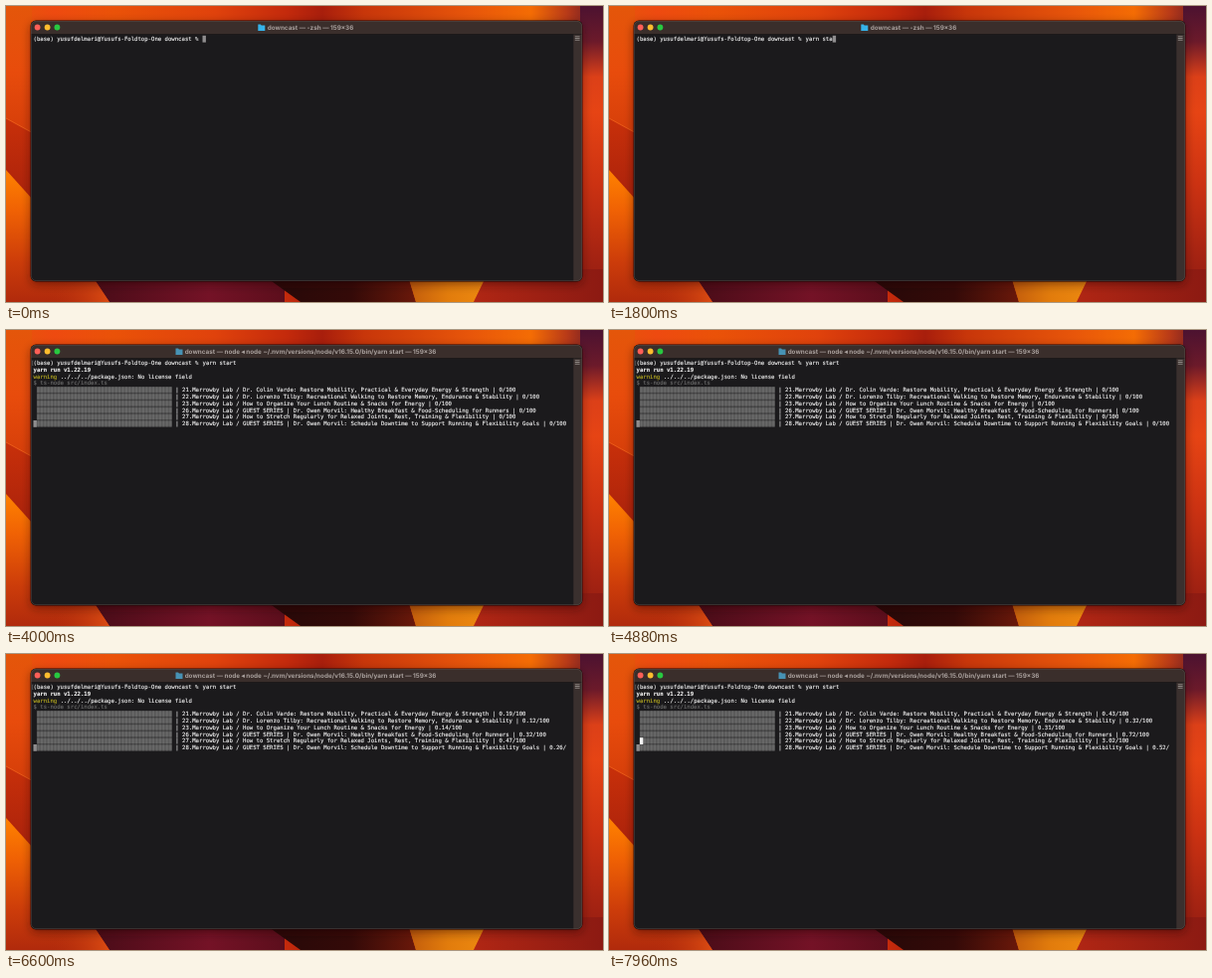
An HTML page that plays this animation: 600x298 px, repeating every 8000 ms.

```html
<!DOCTYPE html>
<html lang="en">
<head>
<meta charset="utf-8">
<title>Terminal</title>
<style>
  html, body { margin: 0; width: 100%; height: 100%; overflow: hidden; background: #c22a0c; }
  svg { display: block; width: 100vw; height: 100vh; }
  text { white-space: pre; text-rendering: geometricPrecision; }
  .mono { font: 5.648px "DejaVu Sans Mono", monospace; fill: #f4f4f4; stroke: #f4f4f4; stroke-width: .12px; }
  .bold { font-weight: 700; }
  .dim { fill: #6a6a6a; stroke: #6a6a6a; }
  .warn { fill: #b9ad20; stroke: #b9ad20; }
  .title { font: 700 6.35px Inter, sans-serif; fill: #aaa19e; text-anchor: middle; }
</style>
</head>
<body>
<svg viewBox="0 0 600 298" preserveAspectRatio="none">
  <defs>
    <linearGradient id="sky">
      <stop offset="0" stop-color="#e4560a"/>
      <stop offset=".08" stop-color="#ee4a10"/>
      <stop offset=".18" stop-color="#ea5208"/>
      <stop offset=".35" stop-color="#e0420c"/>
      <stop offset=".47" stop-color="#c42a0c"/>
      <stop offset=".53" stop-color="#a81e0c"/>
      <stop offset=".6" stop-color="#c8360a"/>
      <stop offset=".78" stop-color="#e8560a"/>
      <stop offset=".88" stop-color="#f46c04"/>
      <stop offset=".94" stop-color="#b83a18"/>
      <stop offset="1" stop-color="#5a1428"/>
    </linearGradient>
    <linearGradient id="leftEdge" x2="0" y2="1">
      <stop offset="0" stop-color="#e4560a"/>
      <stop offset=".22" stop-color="#e84c0c"/>
      <stop offset=".4" stop-color="#d8400a"/>
    </linearGradient>
    <linearGradient id="rightEdge" x2="0" y2="1">
      <stop offset="0" stop-color="#4c1230"/>
      <stop offset=".12" stop-color="#6c1a2a"/>
      <stop offset=".24" stop-color="#dc4018"/>
      <stop offset=".36" stop-color="#e64414"/>
      <stop offset=".6" stop-color="#cc3212"/>
      <stop offset="1" stop-color="#8c1a12"/>
    </linearGradient>
    <linearGradient id="fold" x2="0" y2="1">
      <stop offset="0" stop-color="#c8300a"/>
      <stop offset="1" stop-color="#9a1a0c"/>
    </linearGradient>
    <linearGradient id="leaf" x2="0" y2="1">
      <stop offset="0" stop-color="#ff8200"/>
      <stop offset=".3" stop-color="#f06204"/>
      <stop offset=".7" stop-color="#cc3c0a"/>
      <stop offset="1" stop-color="#b02a0c"/>
    </linearGradient>
    <linearGradient id="tip">
      <stop offset="0" stop-color="#b02a0c" stop-opacity="0"/>
      <stop offset="1" stop-color="#dc4c12"/>
    </linearGradient>
    <linearGradient id="plum">
      <stop offset="0" stop-color="#4a0c18"/>
      <stop offset=".6" stop-color="#741226"/>
      <stop offset="1" stop-color="#5c0e1c"/>
    </linearGradient>
    <linearGradient id="night">
      <stop offset="0" stop-color="#240808"/>
      <stop offset=".6" stop-color="#340a08"/>
      <stop offset="1" stop-color="#6a180a"/>
    </linearGradient>
    <linearGradient id="glow">
      <stop offset="0" stop-color="#c05a0c"/>
      <stop offset=".5" stop-color="#e27c0c"/>
      <stop offset="1" stop-color="#ee8a10"/>
    </linearGradient>
    <linearGradient id="ember">
      <stop offset="0" stop-color="#b02614"/>
      <stop offset="1" stop-color="#8c1a12"/>
    </linearGradient>
    <filter id="shade" x="-10%" y="-10%" width="120%" height="125%">
      <feDropShadow dx="0" dy="3" stdDeviation="5" flood-color="#200" flood-opacity=".45"/>
    </filter>
    <pattern id="cell" x="27.5" y="29.8" width="3.4" height="6.8" patternUnits="userSpaceOnUse">
      <rect width="3.4" height="6" y=".3" fill="#4d4d4d"/>
      <rect width="2.5" height="6" x=".4" y=".3" fill="#686868"/>
    </pattern>
    <clipPath id="frame"><rect x="25" y="15" width="554" height="262" rx="5"/></clipPath>
  </defs>

  <rect width="600" height="298" fill="url(#sky)"/>
  <rect y="0" width="26" height="298" fill="url(#leftEdge)"/>
  <rect x="577" width="23" height="298" fill="url(#rightEdge)"/>
  <path d="M0 113L40 135V240H0Z" fill="url(#fold)"/>
  <path d="M0 113L40 135" stroke="#f2641c" stroke-width=".8"/>
  <path d="M90 265H280V298H90Z" fill="url(#plum)"/>
  <path d="M0 165L27 195Q70 245 104 298H0Z" fill="url(#leaf)"/>
  <path d="M40 265H82L104 298H40Z" fill="url(#tip)"/>
  <path d="M250 265L296 298H412L402 265Z" fill="url(#night)"/>
  <path d="M402 265H486L470 298H412Z" fill="url(#glow)"/>
  <path d="M486 265H600V298H470Z" fill="url(#ember)"/>

  <rect x="24.6" y="14.6" width="554.8" height="262.8" rx="5.4" fill="#1c0c0a" filter="url(#shade)"/>
  <g clip-path="url(#frame)">
    <rect x="25" y="15" width="554" height="262" fill="#1b1a1c"/>
    <rect x="25" y="15" width="554" height="13.5" fill="#3a2e2b"/>
    <rect x="25" y="28" width="554" height=".6" fill="#151313"/>
    <rect x="570.3" y="28.6" width="9" height="249" fill="#3a302e"/>
  </g>
  <rect x="25.4" y="15.4" width="553.2" height="261.2" rx="4.8" fill="none" stroke="#5a4e4a" stroke-width=".5"/>
  <circle cx="31.6" cy="21.5" r="2.9" fill="#ff5f57"/>
  <circle cx="41.6" cy="21.5" r="2.9" fill="#febc2e"/>
  <circle cx="51.4" cy="21.5" r="2.9" fill="#28c840"/>
  <path d="M571.8 30.7h4.8M571.8 32.5h4.8M571.8 34.3h4.8" stroke="#8b8380" stroke-width="1.1"/>
  <path id="folder" d="M0 18.6h2.6l.8.9h3.6v5.4h-7z"/>
  <text id="title" class="title" x="306" y="23.9"></text>
  <g id="screen"></g>
</svg>
<script>
const LOOP = 8000, COL = 3.4, ROW = 6.8, LEFT = 27.5, TOP = 29.8, COLUMNS = 158, BLOCKS = 40;
const PROMPT = '(base) yusufdelmari@Yusufs-Foldtop-One downcast % ';
const COMMAND = 'yarn start';
const KEYS = [1000, 1110, 1220, 1330, 1440, 1550, 1650, 1760, 1880, 2000];
const ENTER = 2280, RUN = 2520, SCRIPT = 2640, BARS = 3480;
const FIRST = 5520, MIDDLE = 6560, LAST = 7920, TICK = 80;

// label, percent at MIDDLE, percent at LAST, growth exponent
const EPISODES = [
  ['21.Marrowby Lab / Dr. Colin Varde: Restore Mobility, Practical & Everyday Energy & Strength', .19, .43, 1],
  ['22.Marrowby Lab / Dr. Lorenzo Tilby: Recreational Walking to Restore Memory, Endurance & Stability', .12, .32, 1],
  ['23.Marrowby Lab / How to Organize Your Lunch Routine & Snacks for Energy', .14, .31, 1],
  ['26.Marrowby Lab / GUEST SERIES | Dr. Owen Morvil: Healthy Breakfast & Food-Scheduling for Runners', .32, .72, 1],
  ['27.Marrowby Lab / How to Stretch Regularly for Relaxed Joints, Rest, Training & Flexibility', .47, 3.02, 2],
  ['28.Marrowby Lab / GUEST SERIES | Dr. Owen Morvil: Schedule Downtime to Support Running & Flexibility Goals', .26, .52, 1]
];

const screen = document.getElementById('screen');
const title = document.getElementById('title');
const folder = document.getElementById('folder');

function add(tag, attrs, content = '') {
  const el = document.createElementNS('http://www.w3.org/2000/svg', tag);
  for (const key in attrs) el.setAttribute(key, attrs[key]);
  el.textContent = content;
  screen.append(el);
  return el;
}
const colX = col => LEFT + col * COL;
const rowY = row => TOP + row * ROW;
const print = (row, col, content, style = '') =>
  add('text', { class: 'mono ' + style, x: colX(col), y: rowY(row) + 5.2 }, content);
const block = (row, col, width, fill) =>
  add('rect', { x: colX(col), y: rowY(row), width: width * COL, height: ROW, fill });
const show = (el, on) => { el.style.display = on ? '' : 'none'; };
const setText = (el, value) => { if (el.textContent !== value) el.textContent = value; };

print(0, 0, PROMPT);
const typed = print(0, PROMPT.length, '');
const timed = [
  [ENTER, print(0, -.75, '[', 'dim')],
  [RUN, print(1, 0, 'yarn run v1.22.19', 'bold')],
  [RUN, print(2, 0, 'warning', 'warn')],
  [RUN, print(2, 8, '../../../package.json: No license field')],
  [SCRIPT, print(3, 0, '$ ts-node src/index.ts', 'dim')]
];
const bars = EPISODES.map(([label, mid, end, power], i) => {
  const row = 4 + i;
  timed.push([BARS, block(row, 1, BLOCKS, 'url(#cell)')]);
  const done = block(row, 1, 0, '#f4f4f4');
  const text = print(row, BLOCKS + 2, '');
  timed.push([BARS, text]);
  return { label, mid, end, power, done, text };
});
const cursor = block(0, 0, 1, '#8f8d8e');

function percent({ mid, end, power }, t) {
  const tick = MIDDLE + Math.floor((t - MIDDLE) / TICK) * TICK;
  if (tick <= FIRST) return 0;
  if (tick <= MIDDLE) return mid * (tick - FIRST) / (MIDDLE - FIRST);
  return mid + (end - mid) * ((tick - MIDDLE) / (LAST - MIDDLE)) ** power;
}

function render(t) {
  const count = KEYS.filter(k => t >= k).length;
  setText(typed, COMMAND.slice(0, count));
  for (const [from, el] of timed) show(el, t >= from);

  for (const bar of bars) {
    const value = percent(bar, t);
    const line = `| ${bar.label} | ${value ? value.toFixed(2) : 0}/100`;
    setText(bar.text, line.slice(0, COLUMNS - BLOCKS - 2));
    bar.done.setAttribute('width', Math.round(value / 100 * BLOCKS) * COL);
  }

  const [row, col] = t < ENTER ? [0, PROMPT.length + count]
    : t < RUN ? [1, 0] : t < SCRIPT ? [3, 0] : t < BARS ? [4, 0] : [9, 0];
  cursor.setAttribute('x', colX(col));
  cursor.setAttribute('y', rowY(row));

  const running = t >= RUN;
  setText(title, running
    ? 'downcast — node ◂ node ~/.nvm/versions/node/v16.15.0/bin/yarn start — 159×36'
    : 'downcast — -zsh — 159×36');
  folder.setAttribute('transform', `translate(${running ? 170.5 : 253.3})`);
  folder.setAttribute('fill', running ? '#4792b4' : '#35b3ea');
}

const start = performance.now();
function frame() {
  render((performance.now() - start) % LOOP);
  requestAnimationFrame(frame);
}
frame();
</script>
</body>
</html>
```
